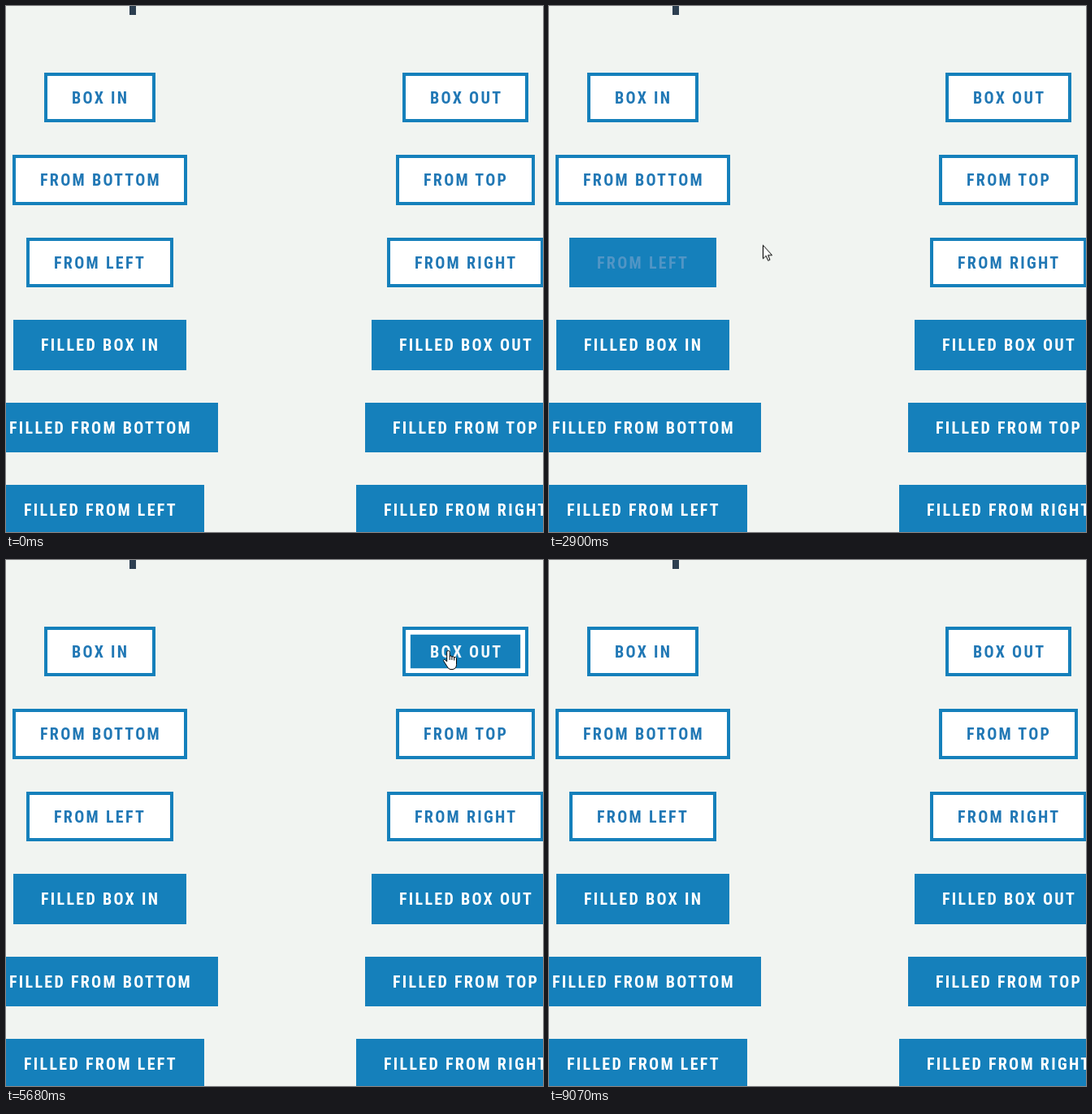
Recreate the animation shown at these times as an HTML page. Size 661 by 647 pixels, loop 9990 ms.

```html
<!DOCTYPE html>
<html lang="en">
<head>
<meta charset="utf-8">
<title>Button hover effects</title>
<style>
@property --p { syntax: "<number>"; inherits: false; initial-value: 0; }

:root { --blue: #1580bb; --ink: #2178b5; --loop: 9990ms; }
html, body { margin: 0; width: 100%; height: 100%; overflow: hidden; }
body { position: relative; background: #f1f4f1; }

.title { position: absolute; left: 152px; top: 0; width: 8px; height: 11px; background: #2c3e50; }

.btn {
  position: absolute; left: var(--x); top: var(--y); width: var(--w); height: var(--h, 61px);
  box-sizing: border-box; padding: 1px 0 0 30px; border: 4px solid var(--blue);
  font: 600 20px/53px "Roboto Condensed", Roboto, sans-serif; font-stretch: 75%;
  letter-spacing: 2.3px; white-space: nowrap;
  --off: var(--ink); --on: #fff; --base: #fff; --fill: var(--blue);
  background: var(--base);
  color: color-mix(in srgb, var(--on) calc(var(--p) * 100%), var(--off));
  animation: var(--hover, none) var(--loop) infinite;
}
.filled { --off: #fff; --on: var(--ink); --base: var(--blue); --fill: #fff; }
.tall { --h: 62px; }

/* hover fills: oversized inset shadows driven by --p */
.in { box-shadow: inset 0 0 0 calc(var(--p) * 100px) var(--fill); }
.out { --base: var(--blue); box-shadow: inset 0 0 0 calc((1 - var(--p)) * 100px) #fff; }
.bottom { box-shadow: inset 0 calc(var(--p) * -150px) 0 0 var(--fill); }
.top { box-shadow: inset 0 calc(var(--p) * 150px) 0 0 var(--fill); }
.left { box-shadow: inset calc(var(--p) * 1000px) 0 0 0 var(--fill); }
.right { box-shadow: inset calc(var(--p) * -1000px) 0 0 0 var(--fill); }
.filled.out { box-shadow: none; }

@keyframes filled-left  { 0%, 7.21% { --p: 0 } 12.21%, 14.26% { --p: 1 } 19.27%, 100% { --p: 0 } }
@keyframes from-left    { 0%, 21.52% { --p: 0 } 26.53%, 26.63% { --p: 1 } 31.63%, 100% { --p: 0 } }
@keyframes from-bottom  { 0%, 31.13% { --p: 0 } 36.14%, 39.79% { --p: 1 } 44.79%, 100% { --p: 0 } }
@keyframes from-top     { 0%, 42.74% { --p: 0 } 47.75%, 51.85% { --p: 1 } 56.86%, 100% { --p: 0 } }
@keyframes box-out      { 0%, 53.35% { --p: 0 } 58.36%, 60.76% { --p: 1 } 65.77%, 100% { --p: 0 } }
@keyframes box-in       { 0%, 64.26% { --p: 0 } 69.27%, 70.77% { --p: 1 } 75.78%, 100% { --p: 0 } }
@keyframes from-right   { 0%, 74.27% { --p: 0 } 79.28%, 80.38% { --p: 1 } 85.39%, 100% { --p: 0 } }
@keyframes filled-right { 0%, 83.38% { --p: 0 } 86.49% { --p: .9 } 90.7%, 100% { --p: 0 } }

.cursor {
  position: absolute; left: 0; top: 0; width: 18px; height: 25px; overflow: visible;
  fill: #fff; stroke: #000; stroke-linejoin: round;
  animation: path var(--loop) linear infinite;
}
.arrow { animation: arrow var(--loop) step-end infinite; }
.hand { animation: hand var(--loop) step-end infinite; }

@keyframes path {
  0%, 4.2% { transform: translate(335px, 641px) }
  5.7% { transform: translate(315px, 632px) }
  7.21% { transform: translate(243px, 618px) }
  9%, 13.4% { transform: translate(224px, 610px) }
  14.11% { transform: translate(237px, 596px) }
  15% { transform: translate(264px, 583px) }
  16.5% { transform: translate(325px, 545px) }
  17.2% { transform: translate(334px, 516px) }
  18.5% { transform: translate(331px, 452px) }
  20% { transform: translate(296px, 364px) }
  21% { transform: translate(238px, 322px) }
  21.52% { transform: translate(205px, 328px) }
  22.6%, 25.6% { transform: translate(178px, 335px) }
  26.63% { transform: translate(207px, 320px) }
  28.4%, 29.03% { transform: translate(263px, 295px) }
  29.9% { transform: translate(258px, 268px) }
  31.13% { transform: translate(222px, 237px) }
  33%, 39.2% { transform: translate(192px, 224px) }
  39.79% { transform: translate(223px, 224px) }
  41.44% { transform: translate(357px, 224px) }
  42.74% { transform: translate(480px, 224px) }
  44.5%, 50.2% { transform: translate(545px, 221px) }
  51.85% { transform: translate(540px, 182px) }
  53.35% { transform: translate(539px, 143px) }
  54.5%, 59.8% { transform: translate(544px, 112px) }
  60.76% { transform: translate(487px, 112px) }
  62.5% { transform: translate(335px, 107px) }
  64.26% { transform: translate(183px, 106px) }
  65.6%, 69.9% { transform: translate(122px, 108px) }
  70.77% { transform: translate(185px, 114px) }
  72.4% { transform: translate(318px, 170px) }
  73.4% { transform: translate(418px, 250px) }
  74.27% { transform: translate(470px, 292px) }
  75.6%, 79.6% { transform: translate(518px, 300px) }
  80.38% { transform: translate(468px, 320px) }
  81.4% { transform: translate(396px, 372px) }
  82% { transform: translate(370px, 432px) }
  82.7% { transform: translate(381px, 520px) }
  83.38% { transform: translate(431px, 592px) }
  85% { transform: translate(505px, 618px) }
  86.49%, 100% { transform: translate(525px, 650px) }
}
@keyframes hand {
  0%, 14.26%, 26.63%, 39.79%, 51.85%, 60.76%, 70.77%, 80.38%, 86.49%, 100% { opacity: 0 }
  7.21%, 21.52%, 31.13%, 42.74%, 53.35%, 64.26%, 74.27%, 83.38% { opacity: 1 }
}
@keyframes arrow {
  0%, 7.21%, 21.52%, 31.13%, 42.74%, 53.35%, 64.26%, 74.27%, 83.38%, 86.49%, 100% { opacity: 0 }
  4.2%, 14.26%, 26.63%, 39.79%, 51.85%, 60.76%, 70.77%, 80.38% { opacity: 1 }
}
</style>
</head>
<body>
<div class="title"></div>

<div class="btn in" style="--x:47px; --y:82px; --w:137px; --hover:box-in">BOX IN</div>
<div class="btn bottom tall" style="--x:8px; --y:183px; --w:215px; --hover:from-bottom">FROM BOTTOM</div>
<div class="btn left" style="--x:25px; --y:285px; --w:181px; --hover:from-left">FROM LEFT</div>
<div class="btn filled in tall" style="--x:9px; --y:386px; --w:213px">FILLED BOX IN</div>
<div class="btn filled bottom" style="--x:-30px; --y:488px; --w:291px">FILLED FROM BOTTOM</div>
<div class="btn filled left tall" style="--x:-12px; --y:589px; --w:256px; --hover:filled-left">FILLED FROM LEFT</div>

<div class="btn out" style="--x:488px; --y:82px; --w:155px; --hover:box-out">BOX OUT</div>
<div class="btn top tall" style="--x:480px; --y:183px; --w:171px; --hover:from-top">FROM TOP</div>
<div class="btn right" style="--x:469px; --y:285px; --w:193px; --hover:from-right">FROM RIGHT</div>
<div class="btn filled out tall" style="--x:450px; --y:386px; --w:231px">FILLED BOX OUT</div>
<div class="btn filled top" style="--x:442px; --y:488px; --w:247px">FILLED FROM TOP</div>
<div class="btn filled right tall" style="--x:431px; --y:589px; --w:269px; --hover:filled-right">FILLED FROM RIGHT</div>

<svg class="cursor" viewBox="0 0 18 25">
  <path class="arrow" d="M.5 -.5V16L4.2 12.5 6.7 18.4 9 17.4 6.6 11.8H11.6Z"/>
  <g class="hand" transform="translate(-6 -1)">
    <path d="M6.5.5Q4.7.5 4.7 2.2V14L3 12Q1 10.4.5 12.4 .6 13.6 2 15.3L5 20Q6.5 23.3 9 23.5H12Q16.5 22.5 16.5 17.5V9.5Q16 7.6 13.7 9 13.3 6.7 10.9 8.1 10.3 6 8.2 7.2V2.2Q8.2.5 6.5.5Z"/>
    <path fill="none" d="M8.2 7V12M10.9 8V12M13.7 9V12.5"/>
  </g>
</svg>
</body>
</html>
```
